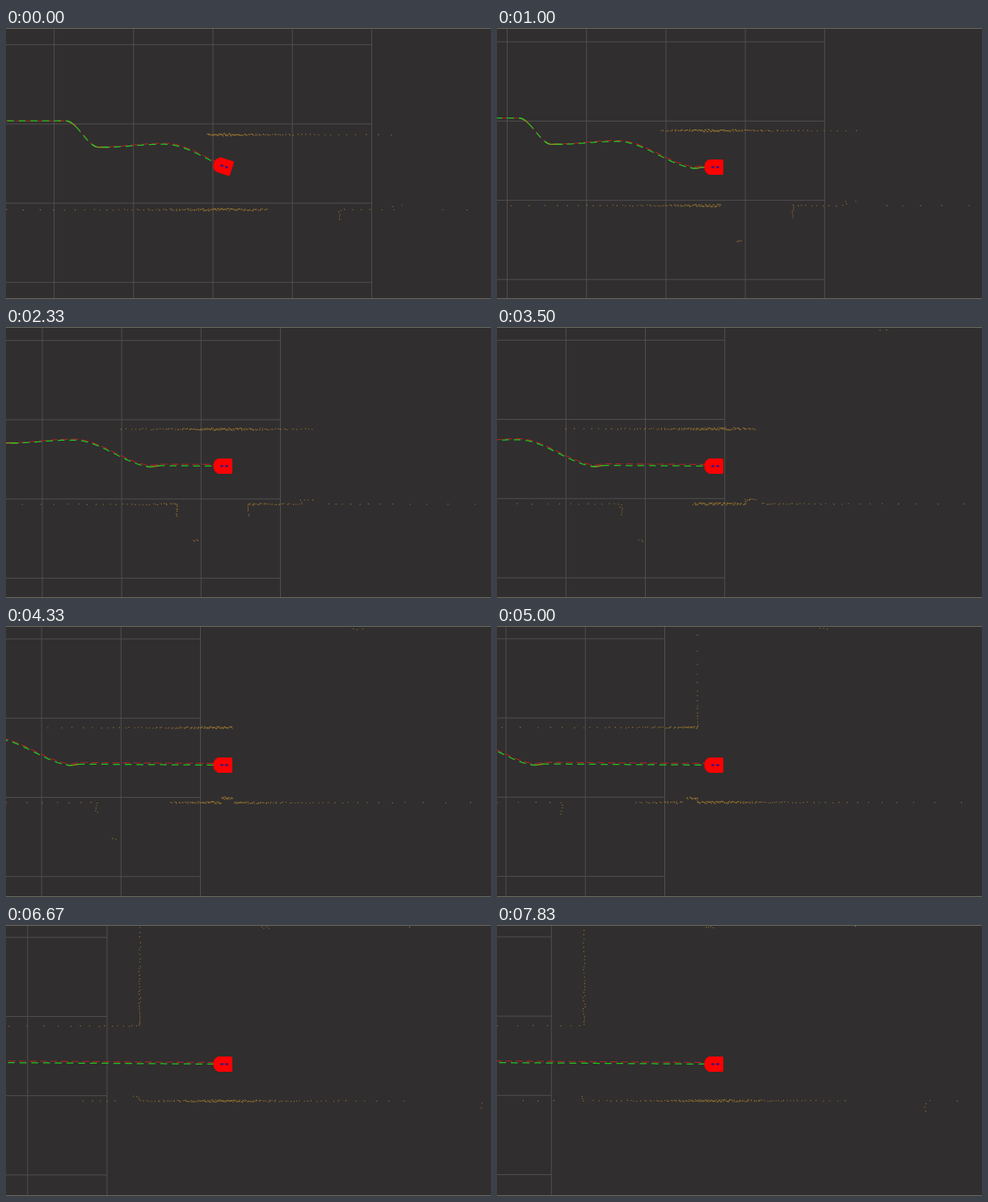
Animation of 600 by 336 pixels, one loop 8 s. Source, as an HTML page:

```html
<!DOCTYPE html>
<html lang="en">
<head>
<meta charset="utf-8">
<title>Robot corridor run</title>
<style>
  html, body { margin: 0; width: 100%; height: 100%; overflow: hidden; background: #302e2f; }
  svg { display: block; width: 100vw; height: 100vh; }
</style>
</head>
<body>
<svg viewBox="0 0 600 336">
  <defs><clipPath id="behind"><rect width="264" height="336"/></clipPath></defs>
  <rect width="600" height="336" fill="#302e2f"/>
  <path id="grid" fill="none" stroke="#514f4f"/>
  <path id="scan" fill="#b4862e" fill-opacity="0.85"/>
  <g clip-path="url(#behind)" fill="none">
    <g id="trail">
      <path id="odom" stroke="#ac2424" stroke-width="1.1" stroke-dasharray="9 4"/>
      <path id="slow" stroke="#8f8a1e" stroke-width="1.5"/>
      <path id="pose" stroke="#20c820" stroke-width="1.25" stroke-dasharray="8.5 6"/>
    </g>
  </g>
  <g id="robot">
    <path d="M10.500-8H-5Q-10-6-10 0T-5 8H10.500Z" fill="#f00" stroke="#f00" stroke-width="3" stroke-linejoin="round"/>
    <g fill="#30188a"><ellipse cx="-1" rx="2" ry="1.300"/><ellipse cx="5" rx="2" ry="1.300"/></g>
  </g>
  <path d="M0 0.500H600M0 335.500H600" stroke="#6a6a5e"/>
</svg>
<script>
const LOOP = 8000, STEPS = 48, CELL = 98.2;
const CX = 268, CY = 172.5, RANGE = 330, RAYS = 361;
const TOP = 110, LOW = 203;
const el = id => document.getElementById(id);

// Wall along y from x1 to x2, its two ends returning by depth
const run = (y, x1, x2, depth) =>
  [[x1, y, x2, y], [x1, y, x1, y + depth], [x2, y, x2, y + depth]];
const walls = [
  run(TOP, -203, 40.5, -130),
  run(LOW, -900, -128, 15), run(LOW, -39.5, 374, 15), run(LOW, 463, 900, 14),
  run(LOW - 5.5, 26, 40, 5.5),
  run(-12.5, 189, 203, -3), run(-13, 375, 382, -3), run(247.5, -109, -102, 3)
].flat();

function ease(x, from, to) {
  const f = Math.max(0, Math.min(1, (x - from) / (to - from)));
  return f * f * (3 - 2 * f);
}

// Height of the driven route in grid coordinates
const routeY = x => 94.5
  + 32.5 * ease(x, -378, -338) - 3.5 * ease(x, -328, -262)
  + 33.5 * ease(x, -255, -156) - 1.8 * ease(x, -163, -148)
  + 0.007 * Math.max(0, x + 149);

// Odometry slowly drifts away from the estimated pose
const drift = x => Math.max(0, Math.min(2, (x + 400) / 120));

function curve(from, to, y) {
  const pts = [];
  for (let x = from; x <= to; x += 2) pts.push(x + " " + y(x).toFixed(2));
  return "M" + pts.join("L");
}

el("pose").setAttribute("d", curve(-480, 220, routeY));
el("odom").setAttribute("d", curve(-480, 220, x => routeY(x) - drift(x)));
el("slow").setAttribute("d", curve(-378, -366, routeY)
  + curve(-346, -324, routeY) + curve(-166, -150, routeY));

// Grid edge and heading at t seconds; the view follows the robot along its route
function poseAt(t) {
  const X = 455 - 49.5 * t - 2.6 * Math.exp(-3 * t);
  const u = Math.min(1, t) ** 2;
  const heading = 18 * (1 - u) * Math.cos(1.5 * Math.PI * u);
  const cy = CY - heading * 0.08;
  return { X, Y: cy - routeY(CX - X), heading, cy };
}

function noise(a, b) {
  const s = Math.sin(a * 12.9898 + b * 78.233) * 43758.5453;
  return (s - Math.floor(s)) * 2 - 1;
}

// Distance along the ray to the nearest wall
function cast(ox, oy, dx, dy) {
  let best = RANGE;
  for (const [x1, y1, x2, y2] of walls) {
    const wx = x2 - x1, wy = y2 - y1, det = dx * wy - dy * wx;
    if (Math.abs(det) < 1e-9) continue;
    const px = x1 - ox, py = y1 - oy;
    const r = (px * wy - py * wx) / det, s = (px * dy - py * dx) / det;
    if (r > 0 && r < best && s >= 0 && s <= 1) best = r;
  }
  return best;
}

function scanPath({ X, Y, heading }, step) {
  const lag = heading * 0.09;
  let d = "";
  for (let i = 0; i < RAYS; i++) {
    const a = (0.62 + i * 360 / RAYS + heading) * Math.PI / 180;
    const dx = Math.cos(a), dy = Math.sin(a);
    let r = cast(CX - X, CY - Y, dx, dy);
    if (r >= RANGE) continue;
    r += noise(i, step) * 1.6;
    const x = CX + r * dx - 0.55, y = CY + r * dy + lag - 0.55;
    d += `M${x.toFixed(2)} ${y.toFixed(2)}h1.1v1.1h-1.1z`;
  }
  return d;
}

function gridPath({ X, Y }) {
  let d = "";
  for (let x = X; x > 0; x -= CELL) d += `M${x} 0V336`;
  for (let y = Y; y < 336; y += CELL) d += `M0 ${y}H${X}`;
  return d;
}

function draw(step) {
  const pose = poseAt(step * LOOP / STEPS / 1000);
  el("grid").setAttribute("d", gridPath(pose));
  el("scan").setAttribute("d", scanPath(pose, step));
  el("trail").setAttribute("transform", `translate(${pose.X} ${pose.Y})`);
  el("robot").setAttribute("transform",
    `translate(${CX} ${pose.cy}) rotate(${pose.heading})`);
}

let shown = -1;
const start = performance.now();
function tick() {
  const t = Math.max(0, performance.now() - start) % LOOP;
  const step = Math.floor((t + 3.4) * STEPS / LOOP) % STEPS;
  if (step !== shown) draw(shown = step);
  requestAnimationFrame(tick);
}
tick();
</script>
</body>
</html>
```
